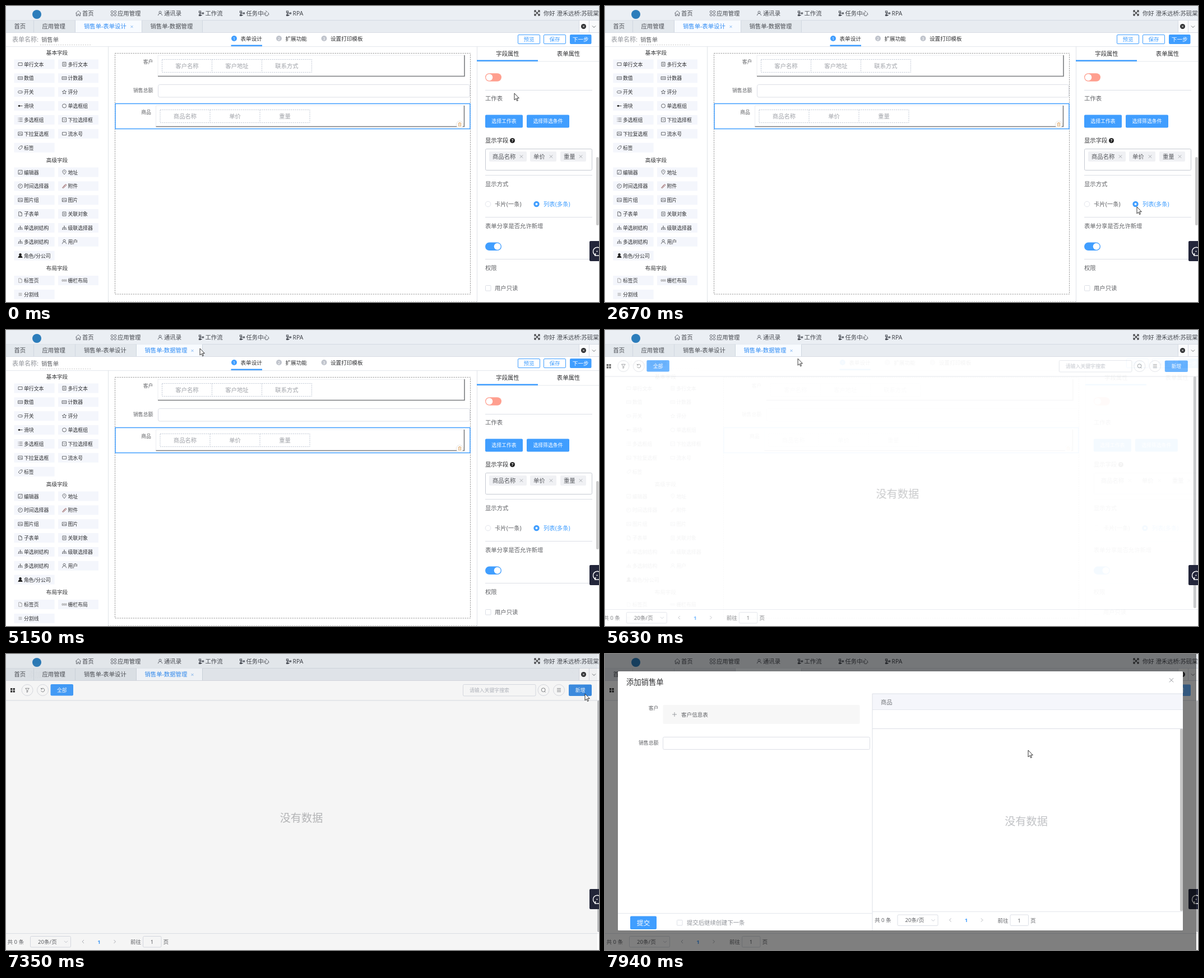
An HTML page for the animation above (8000 ms loop, 1058 px wide and 529 px high).

```html
<!DOCTYPE html>
<html lang="zh-CN">
<head>
<meta charset="utf-8">
<title>销售单</title>
<style>
html, body { margin: 0; width: 100%; height: 100%; overflow: hidden; background: #fff; }
svg { display: block; width: 1058px; height: 529px; }
text { font-family: "Noto Sans", "Noto Sans CJK SC", "Noto Sans CJK", sans-serif; white-space: pre; }
.designer, .records, .shade, .dialog, .cursor { animation: 8s linear infinite; }
.flip { animation: 8s step-end infinite; }
.designer { animation-name: leave; }
.records { animation-name: enter; }
.shade { animation-name: shade; }
.dialog { animation-name: drop; }
.cursor { animation-name: travel; }
.before { animation-name: before; }
.after { animation-name: after; }
.loaded { animation-name: loaded; }
.press { animation-name: press; }

@keyframes leave {
  0%, 67.5% { opacity: 1; transform: none; animation-timing-function: ease; }
  73.75%, 100% { opacity: 0; transform: translateX(22px); }
}
@keyframes enter {
  0%, 67.5% { opacity: 0; transform: translateX(-22px); animation-timing-function: ease; }
  73.75%, 100% { opacity: 1; transform: none; }
}
@keyframes shade {
  0%, 91.5% { opacity: 0; animation-timing-function: ease; }
  95.875%, 100% { opacity: .5; }
}
@keyframes drop {
  0%, 91.625% { opacity: 0; transform: translateY(-14.8px); animation-timing-function: ease; }
  98.19%, 100% { opacity: 1; transform: none; }
}
@keyframes before { 0% { visibility: visible; } 62.25%, 100% { visibility: hidden; } }
@keyframes after { 0% { visibility: hidden; } 62.25%, 100% { visibility: visible; } }
@keyframes loaded { 0% { visibility: hidden; } 99.25%, 100% { visibility: visible; } }
@keyframes press {
  0% { fill: #409eff; }
  83.5% { fill: #66b1ff; }
  89% { fill: #3a8ee6; }
  95%, 100% { fill: #66b1ff; }
}
@keyframes travel {
  0%, .875% { transform: translate(907px, 156px); }
  3.75% { transform: translate(808px, 205px); }
  6.25% { transform: translate(870px, 334px); }
  8.1% { transform: translate(982px, 300px); }
  10%, 12.1% { transform: translate(940px, 290px); }
  13.75% { transform: translate(993px, 250px); }
  15.6% { transform: translate(866px, 236px); }
  17.875% { transform: translate(937px, 276px); }
  21.875%, 22.75% { transform: translate(960px, 319px); }
  25% { transform: translate(972px, 340px); }
  26.9% { transform: translate(945px, 363px); }
  28.4%, 33.4% { transform: translate(949px, 359px); animation-timing-function: ease-in-out; }
  42%, 46.75% { transform: translate(474px, 239px); animation-timing-function: ease-in-out; }
  55.6%, 64.4% { transform: translate(346px, 33px); }
  70.375% { transform: translate(344px, 51px); }
  74.4%, 75.25% { transform: translate(367px, 95px); animation-timing-function: ease-in-out; }
  84.4%, 86% { transform: translate(1043px, 72px); }
  86.9%, 91.9% { transform: translate(1033px, 71px); }
  94.125% { transform: translate(940px, 101px); }
  99.25%, 100% { transform: translate(755px, 172px); }
}
</style>
</head>
<body>
<script>
const BLUE = '#409eff', INK = '#303133', GREY = '#606266', PALE = '#909399', EDGE = '#dcdfe6';

// Drawing helpers: text is placed by its vertical centre.
const text = (x, y, s, size = 10.35, fill = GREY, anchor = 'start', extra = '') =>
  `<text x="${x}" y="${y + size * .37}" font-size="${size}" fill="${fill}" text-anchor="${anchor}" ${extra}>${s}</text>`;
const mid = (x, y, s, size, fill, extra) => text(x, y, s, size, fill, 'middle', extra);
const rect = (x, y, w, h, fill, stroke = 'none', r = 0, extra = '') =>
  `<rect x="${x}" y="${y}" width="${w}" height="${h}" rx="${r}" fill="${fill}" stroke="${stroke}" ${extra}/>`;
const path = (d, stroke, width = 1, fill = 'none', extra = '') =>
  `<path d="${d}" stroke="${stroke}" stroke-width="${width}" fill="${fill}" ${extra}/>`;
const hline = (x1, x2, y, color = '#e4e7ed', extra = '') => path(`M${x1} ${y}H${x2}`, color, 1, 'none', extra);
const circle = (x, y, r, fill, stroke = 'none') =>
  `<circle cx="${x}" cy="${y}" r="${r}" fill="${fill}" stroke="${stroke}" stroke-width=".8"/>`;
const cross = (x, y, r, color, w = .9) => path(`M${x - r} ${y - r}l${2 * r} ${2 * r}m0 ${-2 * r}l${-2 * r} ${2 * r}`, color, w);
const group = (cls, ...parts) => `<g class="${cls}">${parts.join('')}</g>`;
const button = (x, y, w, h, label, size, extra) =>
  rect(x, y, w, h, BLUE, 'none', 2, extra) + mid(x + w / 2, y + h / 2, label, size, '#fff');

const ICONS = {
  box: 'M-3.5-2.5h7v5h-7z',
  doc: 'M-3-3.5h6v7h-6zM-1.5-1h3M-1.5 1h3',
  num: 'M-4-2.5h8v5h-8zM-2-1v2M0-1v2M2-1v2',
  toggle: 'M-2-2h4a2 2 0 0 1 0 4h-4a2 2 0 0 1 0-4zM2-.5v1',
  star: 'M0-3.7L1.1-1.2 3.7-1 1.7.8 2.3 3.4 0 2-2.3 3.4-1.7.8-3.7-1-1.1-1.2z',
  slider: 'M-4 0h8M-3-1h2v2h-2z',
  ring: 'M-3.5 0a3.5 3.5 0 1 0 7 0a3.5 3.5 0 1 0-7 0',
  list: 'M-4-3h1M-2-3h6M-4 0h1M-2 0h6M-4 3h1M-2 3h6',
  select: 'M-3.5-3.5h7v7h-7zM-2-1l2 2 2-2',
  image: 'M-3.7-3h7.4v6h-7.4zM-3 2l2.2-3 1.5 2 1-1 1.6 2',
  tag: 'M-3.5 1L.5-3.2h3v3L-.5 3.8zM1.7-1.5h.5',
  edit: 'M-3.5-3.5h7v7h-7zM-1.5 1.5l3-3M-2 2h1',
  pin: 'M0 4C-5-1-3-4 0-4S5-1 0 4zM-1-1h2',
  clock: 'M-3.8 0a3.8 3.8 0 1 0 7.6 0a3.8 3.8 0 1 0-7.6 0M0-2v2h-2',
  clip: 'M-3.5 3L2-3.2q2 0 1.5 2L-1 3q-2 .8-2.5 0zM-1.5 1.5l3-3.3',
  page: 'M-2.8-3.7h3.6l2 2v5.4h-5.6zM.8-3.7v2h2',
  tree: 'M0-3v3M-3 3v-3h6v3M0 0v3M-1-3h2M-4 3h2M-1 3h2M2 3h2',
  user: 'M-2-1.8a2 2 0 1 0 4 0a2 2 0 1 0-4 0M-3.7 4q.4-3.8 3.7-3.8t3.7 3.8',
  grid: 'M-4-1.5h2v3h-2zM-1-1.5h2v3h-2zM2-1.5h2v3h-2z',
  lines: 'M-3-2h6M-3 0h6M-3 2h6',
  home: 'M-4.7 0L0-4.5 4.7 0M-3.5-1v5.5h2.3v-3h2.4v3h2.3v-5.5',
  apps: 'M-4.8-2.6a2 2 0 1 0 4 0a2 2 0 1 0-4 0M.8-2.6a2 2 0 1 0 4 0a2 2 0 1 0-4 0M-4.8 2.8a2 2 0 1 0 4 0a2 2 0 1 0-4 0M.8 2.8a2 2 0 1 0 4 0a2 2 0 1 0-4 0',
  flow: 'M-4-4h3v3h-3zM-2.5-1v4.5h4M-2.5 0h5M2-1h2v2h-2zM-4 2.5h3v2h-3z',
  expand: 'M-4-4l8 8M4-4l-8 8M-4.5-1v-3.5h3M4.5-1v-3.5h-3M-4.5 1v3.5h3M4.5 1v3.5h-3'
};
const icon = (kind, x, y, color = '#4a4c50', w = .8, fill = 'none') =>
  path(ICONS[kind], color, w, fill, `transform="translate(${x} ${y})"`);

function header() {
  const nav = [['home', 129, '首页'], ['apps', 192, '应用管理'], ['user', 275, '通讯录'],
    ['flow', 348.5, '工作流'], ['flow', 421.5, '任务中心'], ['flow', 504.5, 'RPA']];
  return rect(0, 0, 1058, 25.5, '#ebeff4') + circle(55, 15, 8, '#2c7dbb') +
    nav.map(([kind, x, label]) => icon(kind, x, 13, '#4c5058', kind == 'flow' ? 1.2 : .8) + text(x + 7, 13, label, 10.35, '#45484e')).join('') +
    icon('expand', 947.5, 12.5, '#303133', 1.1) + text(959, 13, '你好 澄禾远桥:苏砚棠', 10.35, '#45484e');
}

function tab(x, w, label, active, labelX) {
  return rect(x, 25.5, w, 22, active ? '#f8fbff' : '#e3e8ed') + path(`M${x + w - .5} 25.5v22`, '#d0d7e0') +
    text(labelX, 36.5, label, 10.35, active ? '#2f8cf5' : '#4b4e54') +
    (active ? cross(x + w - 18.5, 37, 2, '#6aa9f0', .8) : '');
}

function tabBar() {
  const design = '销售单-表单设计', data = '销售单-数据管理';
  return rect(0, 25, 1058, 22, '#e8ecf1') + hline(0, 1058, 25.5, '#d5dbe3') +
    tab(0, 50, '首页', false, 14.5) + tab(50, 74, '应用管理', false, 64.5) +
    group('flip before', tab(124, 119, design, true, 139), tab(243, 108, data, false, 257.5)) +
    group('flip after', tab(124, 109, design, false, 139), tab(233, 118, data, true, 247.5)) +
    rect(1022, 26, 36, 21, '#fafbfc') + path('M1022.5 26v21M1040.5 26v21', '#d8dce5') +
    circle(1030.5, 36.5, 4.5, '#303133') + cross(1030.5, 36.5, 1.6, '#fff') +
    path('M1046 35.5l3 3 3-3', '#606266', .9) + hline(0, 1058, 47.5, '#d8dce5');
}

function palette() {
  const sections = [
    ['基本字段', 83, 104, 'box 单行文本,doc 多行文本,num 数值,num 计数器,toggle 开关,star 评分,slider 滑块,ring 单选框组,list 多选框组,select 下拉选择框,image 下拉复选框,box 流水号,tag 标签'],
    ['高级字段', 275.5, 297, 'edit 编辑器,pin 地址,clock 时间选择器,clip 附件,image 图片组,image 图片,page 子表单,doc 关联对象,tree 单选树结构,tree 级联选择器,tree 多选树结构,user 用户,user 角色/分公司'],
    ['布局字段', 468.5, 490.5, 'page 标签页,grid 栅栏布局,lines 分割线']
  ];
  return sections.map(([title, titleY, top, list]) => mid(91, titleY, title, 9.6, INK) +
    list.split(',').map((item, i) => {
      const [kind, label] = item.split(' ');
      const x = i % 2 ? 93 : 14.5, y = top + Math.floor(i / 2) * 24.85;
      const solid = label.startsWith('角色') || kind == 'slider';
      const color = kind == 'clip' ? '#8a4a4a' : top > 480 ? '#999' : '#4a4c50';
      return rect(x, y - 8.5, 72, 17, '#f4f6fc') + icon(kind, x + 11, y, solid ? '#222' : color, .8, solid ? '#222' : 'none') +
        text(x + 17.5, y + .3, label, 8.88, INK);
    }).join('')).join('');
}

function fieldTable(x, y, labels) {
  const dash = 'stroke-dasharray="2.2 1.5"', right = x + 550 - (x > 270 ? 3 : 0);
  return path(`M${x} ${y + 37}V${y}H${right}`, '#eceef2') + path(`M${x} ${y + 37.5}H${right}V${y}`, '#7b7d80', 1.6) +
    rect(x + 7.5, y + 7.5, 267, 23, 'none', '#c3cad6', 0, dash) +
    path(`M${x + 96.5} ${y + 7.5}v23M${x + 185.5} ${y + 7.5}v23`, '#c3cad6', 1, 'none', dash) +
    labels.map((s, i) => mid(x + 52 + i * 89, y + 19, s, 10.35, '#a0a3a9')).join('');
}

function canvasArea() {
  return path('M182.5 72v457M840.5 72v457', '#e0e3e8') +
    rect(194.5, 84.5, 634, 430.5, 'none', '#999', 0, 'stroke-dasharray="2.4 1.6"') +
    hline(182, 840, 528.5, '#ccc', 'stroke-dasharray="2 2"') +
    text(262.5, 99.5, '客户', 8.88, GREY, 'end') + fieldTable(271, 88, ['客户名称', '客户地址', '联系方式']) +
    text(262.5, 151, '销售总额', 8.88, GREY, 'end') + rect(271.5, 140.5, 556, 22.5, '#fff', EDGE, 3) +
    rect(195, 174.5, 633, 45, 'none', BLUE, 0, 'stroke-width="1.5"') +
    text(259, 190, '商品', 8.88, GREY, 'end') + fieldTable(267.5, 178, ['商品名称', '单价', '重量']) +
    circle(809.5, 212, 6.3, '#fff', '#dedede') +
    path('M806.5 209.8h6M808.3 209.5v-1h2.4v1M807.3 210v5h4.4v-5M808.8 211.5v2M810.3 211.5v2', '#d99a50', .7);
}

function toggle(x, y, color, on) {
  return rect(x, y, 29, 14.6, color, 'none', 7.3) + circle(x + (on ? 21.7 : 7.3), y + 7.3, 6, '#fff');
}

function properties() {
  const tags = [[862, 67, '商品名称'], [935, 47, '单价'], [989, 46, '重量']];
  const sections = [[165.5, '工作表'], [318, '显示方式'], [393, '表单分享是否允许新增'], [468, '权限']];
  return mid(895, 85.5, '字段属性', 10.35, INK) + mid(1003.5, 85.5, '表单属性', 10.35, INK) +
    hline(840, 1058, 99) + rect(840, 96.5, 109, 2.5, BLUE) + toggle(855, 120.2, '#ff9f8f', false) +
    [150.5, 302.5, 377.5, 452.5].map(y => hline(855, 1046, y, EDGE)).join('') +
    sections.map(([y, s]) => text(855, y, s)).join('') +
    button(855, 194.5, 67, 23, '选择工作表', 8.88) + button(929, 194.5, 76, 23, '选择筛选条件', 8.88) +
    text(855, 240.5, '显示字段', 10.35, INK) + circle(903.5, 240.5, 4.5, '#222') + mid(903.5, 240.5, '?', 7.5, '#fff', 'font-weight="700"') +
    rect(855.5, 255.5, 190, 38, '#fff', '#c6cad2', 2) +
    tags.map(([x, w, s]) => rect(x, 260, w, 18, '#f0f1f4', 'none', 2) + text(x + 6, 269, s, 10.35, '#55575c') + cross(x + w - 9.5, 269, 2.7, '#9a9da3', .8)).join('') +
    circle(860, 354, 4.8, '#fff', EDGE) + text(872, 354, '卡片(一条)') +
    circle(946.5, 354, 5.2, BLUE) + circle(946.5, 354, 2, '#fff') + text(959, 354, '列表(多条)', 10.35, BLUE) +
    toggle(855, 422.5, BLUE, true) + rect(855.5, 499.5, 9.5, 9.5, '#fff', EDGE, 1) + text(872, 504.5, '用户只读') +
    rect(1053, 270, 4.5, 122, '#c9c9c9', 'none', 2);
}

function designer() {
  const steps = [[407, '表单设计'], [487, '扩展功能'], [567.5, '设置打印模板']];
  const outlined = (x, s) => rect(x, 51.5, 39, 16, '#fff', BLUE, 1.5) + mid(x + 19.5, 59.5, s, 9.6, BLUE);
  return group('designer', rect(0, 48, 1058, 481, '#fff'),
    text(11, 60, '表单名称:', 11, PALE), text(63, 60, '销售单'), hline(61, 152, 69.5, '#ccc', 'stroke-dasharray="2 2"'),
    steps.map(([x, s], i) => circle(x, 58, 5, i ? '#c0c4cc' : BLUE) + mid(x, 58, i + 1, 7, '#fff') + text(x + 11.5, 58, s, 9.6, INK)).join(''),
    rect(401.5, 69.5, 55.5, 2.5, BLUE),
    outlined(913.5, '预览'), outlined(959.5, '保存'), button(1006, 51, 38.5, 17, '下一步', 9.6),
    hline(0, 1058, 72.5), palette(), canvasArea(), properties());
}

function pager(dx = 0, dy = 0) {
  return `<g transform="translate(${dx} ${dy})">` + text(2.5, 514, '共 0 条', 9.6) +
    rect(43.5, 504.5, 72, 19.5, 'none', EDGE, 2) + text(57, 514, '20条/页', 9.6) + path('M104 512.8l3 3 3-3', '#c0c4cc', .9) +
    path('M139 511l-3 3 3 3M192.5 511l3 3-3 3', '#a8abb2', .9) + mid(166, 514, '1', 9.6, BLUE, 'font-weight="700"') +
    text(222, 514.5, '前往', 9.6) + rect(244.5, 504.5, 32.5, 19.5, 'none', EDGE, 2) + mid(260.5, 514.5, '1', 9.6, GREY) +
    text(280.5, 514.5, '页', 9.6) + '</g>';
}

function records() {
  const round = x => circle(x, 64.5, 10, '#fff', '#d3d6dd');
  return group('records', rect(0, 48, 1090, 481, '#fff'),
    [8, 12.5].map(x => [61, 65.3].map(y => rect(x, y, 3.3, 3.3, '#333')).join('')).join(''),
    [38, 65.5, 959, 986.5].map(round).join(''),
    path('M34.7 61.3h6.6l-2.5 3.4v3l-1.6.9v-3.9z', '#606266', .7),
    path('M63 62.5a3.2 3.2 0 1 1-.5 3M62.7 60.8v2h2', '#606266', .8),
    path('M955.3 64.2a3.4 3.4 0 1 0 6.8 0a3.4 3.4 0 1 0-6.8 0M961 67l1.5 1.5', '#606266', .8),
    path('M983 61.7h7M983 64.5h7M983 67.3h7', '#606266', .8),
    button(79.5, 54, 40.5, 20.5, '全部', 8.88),
    rect(815.5, 54.5, 129.5, 20.5, '#fff', EDGE, 2), text(827, 64.8, '请输入关键字搜索', 8.88, '#b4b8c0'),
    button(1004, 54.5, 41, 20.5, '新增', 8.88, 'class="flip press"'),
    hline(0, 1090, 83, EDGE), mid(527, 293, '没有数据', 19.2, '#b9babc'),
    rect(1055, 83, 5, 414, '#b9babc', 'none', 2), hline(0, 1090, 499.5), pager());
}

function dialog() {
  const body = group('flip loaded',
    text(95.5, 97, '客户', 8.88, GREY, 'end'), rect(103.5, 91, 351, 34, '#f7f7f7', 'none', 2),
    path('M120 108h8M124 104v8', '#909399', .9), text(136, 108, '客户信息表', 9.6),
    text(95.5, 159, '销售总额', 8.88, GREY, 'end'), rect(103.5, 148.5, 369, 22, '#fff', EDGE, 2),
    rect(477, 71, 554, 29, '#f5f6fb'), hline(477, 1031, 71, EDGE), hline(477, 1031, 99.5), text(492, 86, '商品', 10.35, '#73767a'),
    hline(477, 1031, 133.5, EDGE), path('M477 71v423', EDGE), mid(751.5, 299, '没有数据', 19.2, '#c0c2c5'),
    rect(1026, 133.5, 5, 326, '#c6c6c6', 'none', 2), hline(477, 1031, 460.5), pager(478.5, -38.5),
    hline(23, 477, 463.5), button(45, 468.5, 47, 23.5, '提交', 11.85),
    rect(128.5, 475.5, 9.5, 9.5, '#fff', EDGE, 1), text(146, 480.5, '提交后继续创建下一条', 10.35, PALE));
  return group('dialog', rect(23, 31, 1008, 463, '#fff', 'none', 1.5),
    text(38, 50.5, '添加销售单', 13.3, INK), cross(1010.5, 46.8, 3.6, '#909399', 1), body);
}

const chat = rect(1041, 420, 20, 36, '#23263a', 'none', 2) +
  path('M1051 445a7.5 7.5 0 1 1 8 0M1051 445.5l1-3.5M1050 446h9', '#fff', 1.5) +
  circle(1054.5, 438.5, 1.1, '#fff');
const cursor = group('cursor', path('M0 0V12L2.8 9.4 4.6 13.6 6.4 12.8 4.6 8.7H8.3z', '#111', .85, '#fff'));

document.body.innerHTML = `<svg viewBox="0 0 1058 529">${designer()}${records()}${header()}${tabBar()}${chat}
  <rect class="shade" width="1055" height="529"/>${dialog()}${cursor}</svg>`;
</script>
</body>
</html>
```
